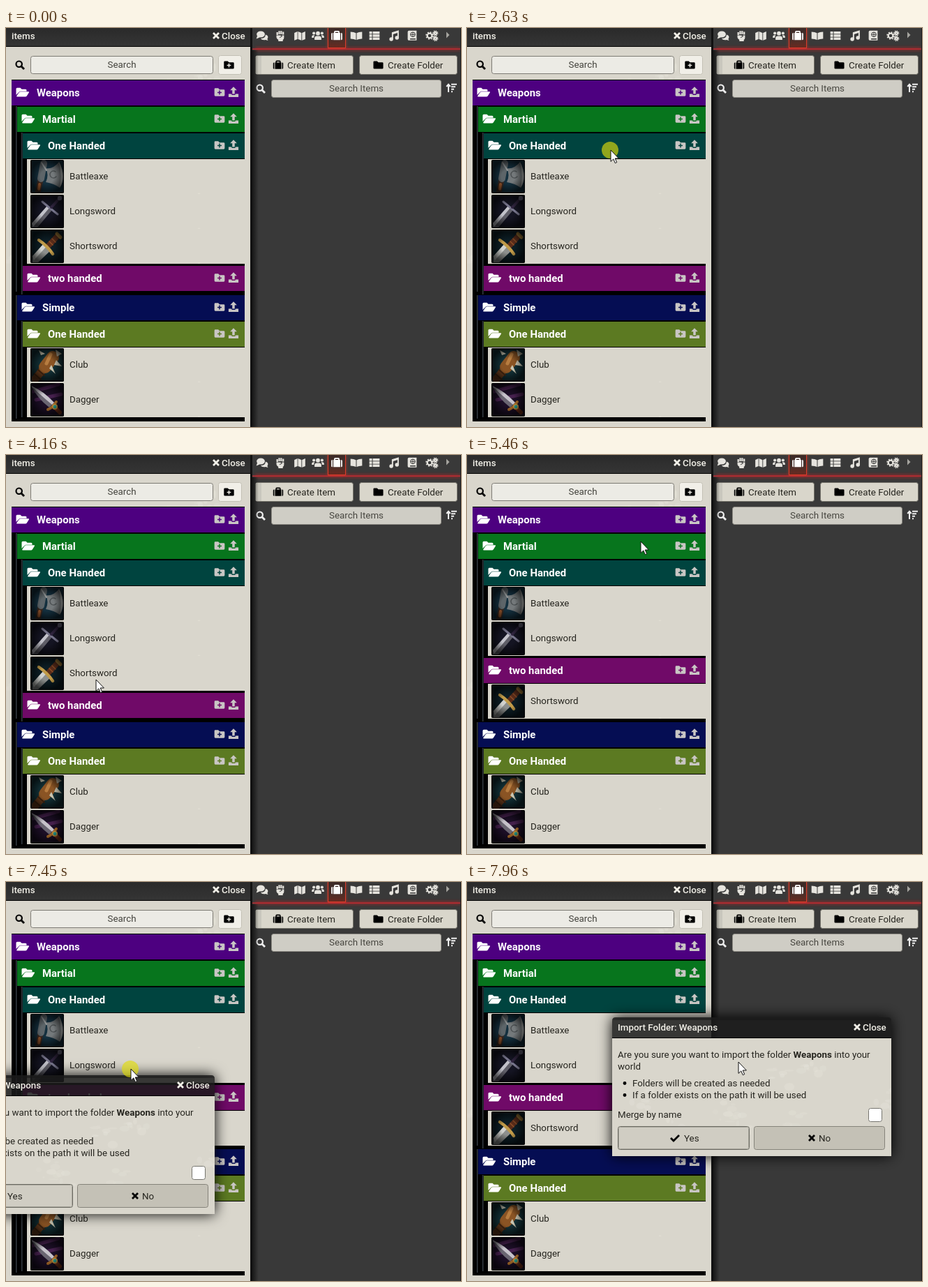
Recreate the animation shown at these times as an HTML page. Size 652x572 px, loop 8000 ms.

```html
<!DOCTYPE html>
<html lang="en">
<head>
<meta charset="utf-8">
<title>Folder browser</title>
<style>
html, body { margin: 0; width: 100%; height: 100%; overflow: hidden; background: #3a3a3a; }
svg { display: block; }
text { font: 13.35px Roboto, sans-serif; fill: #26251f; white-space: pre; }
.bar { font-weight: 500; fill: #f2f0e8; }
.head { font-size: 14.9px; font-weight: 700; fill: #fff; }
.mid { text-anchor: middle; }
.b { font-weight: 700; }
.glow { filter: drop-shadow(0 0 3px #f00); }
</style>
</head>
<body>
<svg id="stage" width="652" height="572" viewBox="0 0 652 572"></svg>
<script>
const LOOP = 8000;
const stage = document.getElementById('stage');
const $ = id => document.getElementById(id);

let seed = 7;
const rnd = () => (seed = seed * 16807 % 2147483647) / 2147483647;

const line = (d, w) => `<path d="${d}" fill="none" stroke="currentColor" stroke-width="${w}"/>`;
const shape = d => `<path d="${d}" fill="currentColor" fill-rule="evenodd"/>`;
const dot = (x, y, r) => `<circle cx="${x}" cy="${y}" r="${r}" fill="currentColor"/>`;
const rect = (x, y, w, h, fill, more = '') =>
  `<rect x="${x}" y="${y}" width="${w}" height="${h}" fill="${fill}" ${more}/>`;
const text = (x, y, s, cls = '') => `<text x="${x}" y="${y}" class="${cls}">${s}</text>`;

const FOLDER = 'M-8,-4.7q0,-1.5 1.5,-1.5h4.5l2,2h6.5q1.5,0 1.5,1.5v7.4q0,1.5 -1.5,1.5h-13q-1.5,0 -1.5,-1.5z';
const cog = (x, y, r) =>
  `<circle cx="${x}" cy="${y}" r="${r}" fill="none" stroke="currentColor" stroke-width="2.2"/>` +
  `<circle cx="${x}" cy="${y}" r="${r + 1.6}" fill="none" stroke="currentColor" stroke-width="1.8" stroke-dasharray="${(r + 1.6) * Math.PI / 8}"/>`;

const ICONS = {
  search: '<circle cx="-1.3" cy="-1.3" r="4.2" fill="none" stroke="currentColor" stroke-width="2.2"/>' + line('M2,2L6,6', 2.8),
  x: line('M-4,-4L4,4M4,-4L-4,4', 2.8),
  check: line('M-6,0l4,4l8,-8', 2.8),
  folder: shape(FOLDER),
  plus: shape(FOLDER + 'M-.8,-2.6h1.6v2.4h2.4v1.6h-2.4v2.4h-1.6v-2.4h-2.4v-1.6h2.4z'),
  open: shape('M-9.5,4V-4.7q0,-1.5 1.5,-1.5h4.5l2,2h5.5q1.5,0 1.5,1.5v1.4h-8.8q-1.5,0 -2.3,1.3z') +
    shape('M-8.8,5.6l3.4,-5.2q.8,-1.2 2,-1.2h11.4q1.6,0 .9,1.2l-3,4.8q-.8,1.2 -2,1.2h-12q-1.2,0 -.7,-.8z'),
  upload: shape('M0,-8l5,5.2h-3.2v5.3h-3.6v-5.3h-3.2z') +
    shape('M-7.3,2.6h4.4q0,1.6 1.2,1.6h3.4q1.2,0 1.2,-1.6h4.4v4.7h-14.6z'),
  suitcase: shape('M-8,-2.5q0,-1.5 1.8,-1.5v10.5q-1.8,0 -1.8,-1.5zM8,-2.5q0,-1.5 -1.8,-1.5v10.5q1.8,0 1.8,-1.5z' +
    'M-5,-4h1v-1.5q0,-1.7 1.7,-1.7h4.6q1.7,0 1.7,1.7v1.5h1v10.5h-10zM-2.2,-4h4.4v-1.4h-4.4z'),
  chat: '<ellipse cx="-2" cy="-2" rx="6" ry="4.6" fill="currentColor"/>' + shape('M-7,0l-1.5,4.5l5,-2z') +
    shape('M5,-1.5q4,1 3.5,4.3q-.3,1.4 -1,2l1.2,2.4l-3.6,-1q-5,1 -7.3,-2q7,0 7.2,-5.7z'),
  fist: line('M-4.4,-5v4M-1.5,-7v5M1.4,-7v5M4.3,-5.5v4', 2.3) +
    shape('M-5.6,-.6h5.6l2,1.4l-3,1.4v1l4.2,-2.2l-1,-1.6h3.3v3.6q0,2 -1.7,3.2v2h-6.6v-2q-2.8,-1.8 -2.8,-4z'),
  map: shape('M-8,-4l4.6,-2v11l-4.6,2zM-2.6,-6l5,2v11l-5,-2zM3.3,-4l4.7,-2v11l-4.7,2z'),
  users: dot(0, -3.4, 3) + dot(-6, -3.6, 2.1) + dot(6, -3.6, 2.1) +
    shape('M-5,6v-2q0,-3.4 3.4,-3.4h3.2q3.4,0 3.4,3.4v2zM-9,3v-1.4q0,-2.3 2.4,-2.3h2q-1.4,1.4 -1.4,3.7zM9,3v-1.4q0,-2.3 -2.4,-2.3h-2q1.4,1.4 1.4,3.7z'),
  book: shape('M-8.5,-5.5q5,0 8,1.6v10q-3,-1.6 -8,-1.6zM8.5,-5.5q-5,0 -8,1.6v10q3,-1.6 8,-1.6z'),
  list: shape('M-7.5,-6h4v3.4h-4zM-2.5,-6h10v3.4h-10zM-7.5,-1.7h4v3.4h-4zM-2.5,-1.7h10v3.4h-10zM-7.5,2.6h4v3.4h-4zM-2.5,2.6h10v3.4h-10z'),
  music: shape('M-3.2,-4.8l10.2,-3v10.8h-2v-7l-6.2,2v7.2h-2z') + dot(-4, 5, 2.8) + dot(4.3, 3, 2.8),
  atlas: shape('M-6.5,-5.5q0,-2 2,-2h11v14.5h-11q-2,0 -2,-2zM-3,4.2v1.3h8v-1.3z') +
    '<g color="#383838"><circle cx="1" cy="-1.7" r="3.4" fill="none" stroke="currentColor"/>' + line('M-2.4,-1.7h6.8M1,-5v6.8', .9) + '</g>',
  cogs: cog(-3, 0, 3.4) + cog(5.4, -3.6, 1.7) + cog(5.4, 4.2, 1.7),
  caret: shape('M-2,-4.5l4.5,4.5l-4.5,4.5z'),
  sort: line('M-4,6v-10M-6.8,-2l2.8,-3.2l2.8,3.2', 2) + line('M0,-5.2h8M0,-1.7h6M0,1.8h4M0,5.3h2', 1.9)
};
const icon = (name, x, y, color = '#000', s = 1, id = '') =>
  `<g ${id && `id="${id}"`} transform="translate(${x} ${y}) scale(${s})" color="${color}">${ICONS[name]}</g>`;

const blade = (d, fill) => `<path d="${d}" fill="${fill}"/>`;
const grip = (d, c, w) => `<path d="${d}" fill="none" stroke="${c}" stroke-width="${w}" stroke-linecap="round"/>`;
const ART = {
  axe: ['#14303f', blade('M22,12Q32,14 41,3Q52,24 42,40Q34,34 22,32Q27,22 22,12', '#74797b') +
    blade('M41,3Q52,24 42,40Q46,22 41,3', '#b4b8b6') + grip('M36,17a5,5 0 1 0 1,7', '#4d5254', 1.5) +
    grip('M18,12L11,45', '#3c2a22', 8) + grip('M19,5L15,27', '#5d6569', 10) + grip('M16,4l7,11', '#969b9c', 2) +
    grip('M13,35l-1,7', '#a45d30', 4)],
  long: ['#141422', blade('M2,41L24,16L31,22L10,47L2,47z', '#5f5e68') + blade('M2,41L24,16L27,19L4,46z', '#c2c2ca') +
    grip('M17,10Q24,16 29,20T39,28', '#77758c', 3) + grip('M30,18L40,7', '#30253f', 4) + `<circle cx="42" cy="5" r="3.2" fill="#77748c"/>`],
  short: ['#0c1d24', blade('M3,38L20,19L30,29L11,47L3,47z', '#8d908e') + blade('M3,38L20,19L24,23L5,44z', '#d0d2ce') +
    grip('M26,23L38,10', '#5a2c1a', 8) + grip('M27,17l5,5M31,13l5,5', '#8b4d26', 1.5) +
    grip('M12,15Q18,19 23,24T32,35', '#c09a48', 4.5) + grip('M38,6l5,5', '#a8813a', 5)],
  club: ['#123036', grip('M7,44L21,27', '#693c1c', 11) + grip('M21,27L32,13', '#8a5424', 18) + grip('M23,22L29,9', '#b67c40', 5) +
    grip('M6,37l9,8M11,31l9,8', '#43250f', 2) +
    blade('M36,2L45,8L38,12zM37,17L45,26L34,24zM30,24L36,37L27,29zM15,10L12,3L21,8z', '#c9c6b2')],
  dagger: ['#1b0e25', grip('M4,12L40,2M8,24L44,16', '#45204d', 5) + blade('M1,4Q18,11 34,28L27,35Q10,22 1,4', '#6a6672') +
    blade('M1,4Q18,11 34,28L31,31Q14,17 1,4', '#c6c2ca') + grip('M25,38Q31,36 37,27', '#a96c2a', 4) +
    grip('M34,34L42,42', '#7c321a', 6) + `<circle cx="35" cy="34" r="4" fill="#c8953e"/><circle cx="35" cy="34" r="2.4" fill="#24a094"/>`]
};

const folder = (id, x, y, color, name) => `<g id="${id}" transform="translate(0 ${y})">
  ${rect(x, 0, 342 - x, 38, '#000')}${rect(x, 1, 342 - x, 36, color)}
  <g id="${id}Open">${icon('open', x + 16, 18, '#fff')}</g>
  <g id="${id}Shut" display="none">${icon('folder', x + 16, 18, '#fff')}</g>
  ${text(x + 36, 24, name, 'head')}
  ${icon('plus', 306, 18, '#c9c6c4', .92, id + 'Add')}${icon('upload', 326, 18, '#c9c6c4', .97, id + 'Up')}</g>`;

const item = (id, y, name) => `<g id="${id}" transform="translate(0 ${y})">
  ${rect(30, 0, 312, 50, 'url(#paper)')}
  <svg x="35" y="1" width="48" height="48">${rect(0, 0, 48, 48, '#020304', 'rx="2"')}${rect(1, 1, 46, 46, ART[id][0], 'rx="2"')}
  ${ART[id][1]}${rect(0, 0, 48, 48, 'url(#vignette)', 'rx="2"')}</svg>
  <svg x="91" y="10" width="246" height="30"><g id="${id}Name">${text(0, 19, name)}</g></svg></g>`;

const tabs = ['chat', 'fist', 'map', 'users', 'suitcase', 'book', 'list', 'music', 'atlas', 'cogs'];
const tabX = [367, 393, 421, 447, 474, 502, 528, 556, 582, 610];

let specks = '';
for (let i = 0; i < 16; i++) {
  const cx = rnd() * 340, cy = rnd() * 350;
  for (let j = 0; j < 7; j++)
    specks += `<ellipse cx="${cx + (rnd() - .5) * 34}" cy="${cy + (rnd() - .5) * 30}" rx="${1 + rnd() * 7}" ry="${1 + rnd() * 5}" fill="#e6e4da" opacity="${.15 + rnd() * .3}"/>`;
}

const button = (x, y, w, h, fill = '#d9d6cb', stroke = '#75736b') =>
  rect(x + .5, y + .5, w - 1, h - 1, fill, `stroke="${stroke}" rx="3"`);

stage.innerHTML = `<defs>
  <pattern id="paper" width="350" height="360" patternUnits="userSpaceOnUse">${rect(0, 0, 350, 360, '#d9d6cc')}${specks}</pattern>
  <radialGradient id="vignette"><stop offset=".4" stop-color="#000" stop-opacity="0"/><stop offset="1" stop-color="#000" stop-opacity=".65"/></radialGradient>
  <linearGradient id="edge"><stop stop-color="#000" stop-opacity=".6"/><stop offset="1" stop-color="#000" stop-opacity="0"/></linearGradient>
  <linearGradient id="bar" x2="0" y2="1"><stop stop-color="#2a2a2a"/><stop offset="1" stop-color="#353535"/></linearGradient>
  <linearGradient id="hot" x2="0" y2="1"><stop stop-color="#3c2825"/><stop offset=".5" stop-color="#42302b"/><stop offset="1" stop-color="#6a2a20"/></linearGradient>
  <radialGradient id="fade" gradientUnits="userSpaceOnUse" cx="129" cy="322" r="200"><stop stop-color="#fff"/><stop offset="1" stop-color="#000"/></radialGradient>
  <mask id="soft" maskUnits="userSpaceOnUse" x="0" y="270" width="352" height="90">${rect(30, 270, 300, 90, 'url(#fade)')}</mask>
  <filter id="blur" x="-20%" y="-300%" width="140%" height="700%"><feGaussianBlur stdDeviation="2"/></filter>
  <filter id="shade" x="-20%" y="-40%" width="140%" height="180%"><feGaussianBlur stdDeviation="10"/></filter>
  <clipPath id="around"><path d="M-60,-60H460V260H-60ZM0,4V199H400V4Z" clip-rule="evenodd"/></clipPath>
</defs>
${rect(353, 0, 299, 572, '#393939')}
${rect(357, 28, 294, 4, '#c82020', 'filter="url(#blur)" opacity=".6"')}${rect(353, 29.5, 298, 1.2, '#d42c34')}
${rect(461, 0, 26, 29, '#ff3a28', 'filter="url(#blur)" opacity=".5"')}
${rect(461.5, -2, 25, 30.5, 'url(#hot)', 'stroke="#dc3c2a"')}
${tabs.map((n, i) => icon(n, tabX[i], 11, n === 'suitcase' ? '#fff' : '#e6e4de', .98)).join('')}
${icon('caret', 633, 10, '#a5a49f')}
${button(357, 39, 141, 28)}${button(506, 39, 141, 28)}
${rect(358, 40, 8, 26, '#c9c7bd')}
${icon('suitcase', 390, 53, '#000', .9)}${text(403, 58, 'Create Item')}
${icon('folder', 533.5, 53, '#000', .88)}${text(547, 58, 'Create Folder')}
${icon('search', 365, 87, '#eee')}${button(380, 74, 244, 26, '#cfcdc5', '#8b8982')}
<g opacity=".8">${text(502, 91, 'Search Items', 'mid')}</g>${icon('sort', 638, 86, '#eee')}
${rect(353, 32, 9, 540, 'url(#edge)')}${rect(651, 0, 1, 572, '#1b1b1b')}

${rect(0, 0, 350, 572, 'url(#paper)')}${rect(350, 0, 3, 572, '#111')}
${rect(0, 0, 350, 26, 'url(#bar)')}${rect(0, 26, 350, 1, '#000')}
${text(8, 16, 'items', 'bar')}${icon('x', 301, 11, '#f2f0e8')}${text(309, 16, 'Close', 'bar')}
${icon('search', 20, 53)}${button(35, 40, 262, 26, '#ecebe5', '#7d7b74')}
<g opacity=".85">${text(166, 57, 'Search', 'mid')}</g>
${button(304, 39, 34, 28, '#f1efe8', '#c3c0b5')}${icon('plus', 319.5, 53, '#000', .9)}
<rect id="back" x="8" y="74" width="334" height="490"/>
<rect id="rail1" x="14" y="112" width="1.5" height="448" fill="#343b42"/>
<rect id="rail2" x="22" y="150" width="1.5" height="408" fill="#343b42"/>
${folder('weapons', 8, 74, '#4d0080', 'Weapons')}
${folder('martial', 16, 112, '#07751d', 'Martial')}
${folder('hand', 24, 150, '#00443f', 'One Handed')}
${item('axe', 188, 'Battleaxe')}${item('long', 238, 'Longsword')}${item('short', 288, 'Shortsword')}
${folder('two', 24, 340, '#700a68', 'two handed')}
<g id="simple">${rect(8, 378, 8, 5, '#000')}${folder('simpleHead', 16, 382, '#050d53', 'Simple')}
${folder('hand2', 24, 420, '#5c7a22', 'One Handed')}${item('club', 458, 'Club')}${item('dagger', 508, 'Dagger')}</g>
<g id="ghost" mask="url(#soft)" opacity=".75"><use href="#short"/></g>

<g id="dialog">
  <g clip-path="url(#around)">${rect(0, 0, 400, 199, '#000', 'filter="url(#shade)"')}</g>
  <path d="M0,29V5q0,-5 5,-5h390q5,0 5,5v24z" fill="#1c1c1c" opacity=".85"/>
  ${rect(0, 29, 400, 170, 'url(#paper)')}${rect(0, 29, 400, 1, '#000')}
  ${text(8, 19, 'Import Folder: Weapons', 'bar')}${icon('x', 351, 14, '#f2f0e8')}${text(359, 19, 'Close', 'bar')}
  <text x="8" y="58">Are you sure you want to import the folder <tspan class="b">Weapons</tspan> into your</text>
  ${text(8, 75, 'world')}${dot(18, 94.5, 2.4)}${text(29, 99, 'Folders will be created as needed')}
  ${dot(18, 111.5, 2.4)}${text(29, 116, 'If a folder exists on the path it will be used')}
  ${text(8, 144, 'Merge by name')}${rect(367.5, 130.5, 19, 19, '#fff', 'rx="3" stroke="#76756f"')}
  ${button(8, 156, 189, 34, '#d0cdc3', '#6b6a62')}${rect(9.5, 157.5, 186, 31, 'none', 'rx="2" stroke="#a9a79d"')}
  ${button(203, 156, 188, 34, '#c4c1b6', '#85837a')}
  ${icon('check', 90, 173)}${text(103, 178, 'Yes')}${icon('x', 286, 173)}${text(296, 178, 'No')}
</g>
<circle id="press" r="12" fill="#e1dc0a" opacity=".65"/>
<path id="cursor" d="M0,0v16.4l3.8,-3.5l2.5,5.8l2.4,-1.1l-2.5,-5.6h5.2z" fill="#fff" stroke="#111"/>`;

const smooth = p => p * p * (3 - 2 * p), out = p => 1 - (1 - p) ** 2.4, into = p => p ** 1.6, flat = p => p;

// Each key: time, x, y and the easing used to reach it.
const POINTER = [
  [500, 573, 552], [1050, 170, 135, out], [1300, 170, 103, out], [1330, 170, 103], [1430, 172, 95, smooth],
  [1940, 172, 95], [2600, 206, 175, smooth], [3290, 206, 175], [3930, 129, 322, smooth],
  [4160, 129, 322], [4700, 131, 360, smooth], [4900, 131, 360], [5460, 249, 124, smooth],
  [5690, 298, 107, out], [5740, 298, 107], [6020, 329, 96, smooth], [6530, 329, 96], [6760, 70, 218, into],
  [7370, 60, 325], [7450, 179, 268, flat], [7700, 478, 207, out], [7790, 478, 207], [7960, 389, 258, smooth]
];
const DIALOG = [[7370, -230, 365], [7450, -101, 277, flat], [7750, 208, 194, out]];

function follow(keys, t) {
  const i = keys.findIndex(k => k[0] > t);
  if (i === 0) return keys[0].slice(1, 3);
  if (i < 0) return keys[keys.length - 1].slice(1, 3);
  const [a, x, y] = keys[i - 1], [b, u, v, ease = smooth] = keys[i];
  const p = ease((t - a) / (b - a));
  return [x + (u - x) * p, y + (v - y) * p];
}

const within = (t, a, b) => t >= a && t < b;
const show = (id, on) => $(id).setAttribute('display', on ? 'inline' : 'none');
const move = (id, x, y) => $(id).setAttribute('transform', `translate(${Math.round(x)} ${Math.round(y)})`);
const glow = (id, on) => $(id).classList.toggle('glow', on);

function draw(t) {
  const [x, y] = follow(POINTER, t);
  const shown = within(t, 500, 6760) || t >= 7370;
  const dragging = within(t, 4160, 4900) || t >= 7370;
  const shut = within(t, 2730, 3060), moved = t >= 4900;
  const lift = shut ? -150 : 0;

  show('handOpen', !shut);
  show('handShut', shut);
  for (const id of ['axe', 'long', 'short']) show(id, !shut);
  move('short', 0, moved ? 328 : 288);
  move('two', 0, moved ? 290 : 340 + lift);
  move('simple', 0, lift);
  $('back').setAttribute('height', 490 + lift);
  $('rail1').setAttribute('height', 448 + lift);
  $('rail2').setAttribute('height', 408 + lift);

  const free = shown && !dragging;
  const rows = { axe: 188, long: 238, short: moved ? 328 : 288 };
  for (const id in rows)
    glow(id + 'Name', free && !shut && within(y, rows[id], rows[id] + 50) && within(x, 30, 342));
  const onIcons = free && within(y, 84, 109);
  glow('weaponsAdd', onIcons && within(x, 297, 315));
  glow('weaponsUp', onIcons && within(x, 317, 336));

  show('ghost', within(t, 4200, 4900));
  move('ghost', x - 129, y - 322);
  show('dialog', t >= 7370);
  move('dialog', ...follow(DIALOG, t));
  show('press', within(t, 2630, 2730) || within(t, 2960, 3060) || within(t, 6250, 6350) || within(t, 7370, 7790));
  move('press', x - 1, y);
  show('cursor', shown);
  move('cursor', x, y);
}

const start = performance.now();
function tick() {
  const t = (performance.now() - start) % LOOP;
  draw(Math.floor(t / 10) * 10);
  requestAnimationFrame(tick);
}
tick();
</script>
</body>
</html>
```
